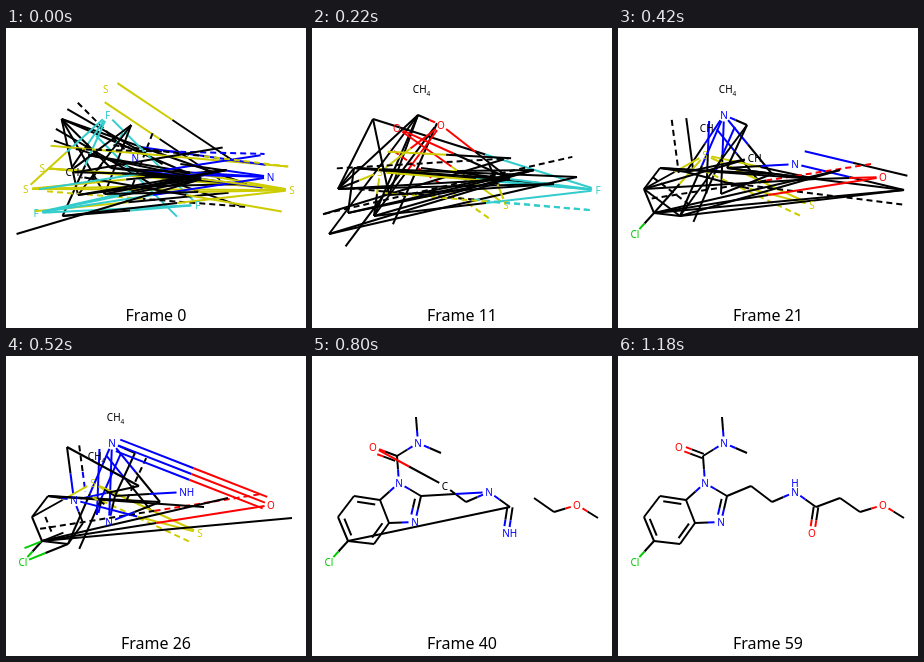
Write an HTML page with a canvas that moves like this. It is 300 px wide and 300 px high and loops after 1400 ms.

```html
<!DOCTYPE html>
<html lang="en">
<head>
<meta charset="utf-8">
<style>
  html, body { margin: 0; width: 100%; height: 100%; overflow: hidden; background: #fff; }
  canvas { display: block; width: 300px; height: 300px; }
</style>
</head>
<body>
<canvas id="stage"></canvas>
<script>
const LOOP = 1400, STEP = 20, LAST = 59;
const FONT = '"Noto Sans", "Open Sans", sans-serif';
const COLORS = { C: '#000', N: '#00f', O: '#f00', S: '#cccc00', F: '#33cccc', Cl: '#00cc00' };

// Atoms a..x
const ATOMS = [
  [104, 61], [106, 87], [129, 97], [85, 100], [61, 91], [87, 127],
  [109, 140], [103, 166], [77, 167], [68, 144], [42, 140], [26, 161],
  [36, 185], [62, 188], [17, 206], [133, 130], [154, 146], [177, 136],
  [198, 151], [194, 177], [222, 142], [242, 156], [265, 149], [286, 162]
];

// Bond kinds: 1 single, 2 double, 3 triple, 4 aromatic, 5 ring double, 6 ring aromatic.
// The second strand of a bond lies to the left of its direction.
const KEYS = [
  { at: 0, labels: 'a:S b:F j:CH4 k:S l:S m:F p:N t:F w:N x:S',
    bonds: 'au2 eq2 eg4 ve2 ei1 es1 eh1 bj4 bl4 bn1 tb2 ci1 cj1 ch4 kx2 kv1 ks1 lx1 ul2 lb1 lv1 ' +
           'xf2 vk4 mw2 mt1 ms1 mu1 nt1 nx1 os1 jw4 wp2 gw1 rw1 hx1 iu2 hu1 is1 fs1 gx4' },
  { at: 5, labels: 'a:F c:O d:NH g:S k:O m:HO n:F w:N',
    bonds: 'ax1 aq1 as1 aj1 ai1 ah4 el1 ei1 he4 eg4 eo1 bo4 bs1 bl1 bt1 lc2 cn1 cs1 ku4 ks1 ' +
           'kr1 xk4 mx1 ms1 nd1 ng1 nu1 hw1 iw1 ow2 lx2 os4 ls1 lv1 iv1 jv1 jx1 gr2 hs1' },
  { at: 11, labels: 'a:CH4 c:O d:O j:S q:CH t:S x:F',
    bonds: 'el1 ei1 ex1 bc1 bo2 bn2 bi1 bl1 cj1 cs1 cn1 td4 ds1 js2 jv1 ju1 jn1 jl1 os2 ow4 ' +
           'xk4 xj4 gx1 nx1 kl1 km1 ks1 kw1 ls4 lv1 ms1 mu1 nu1 hu1 rt1 iv1' },
  { at: 21, labels: 'a:CH4 b:N d:CH f:S o:Cl p:CH r:N t:S w:O',
    bonds: 'bc1 ej4 bn2 hb2 qb2 bj1 fs1 tf4 fm1 fl1 jt1 gr1 rx2 xg4 mw4 sw1 kl1 jk1 lm1 mn1 mo1 ' +
           'jp1 mu1 mx1 lp1 kq1 nu1 ni1 ks1 ls1 gs1 cg1 ci1 nx1 hq1 ln4' },
  { at: 30, labels: 'b:N d:CH4 f:N h:N j:N o:Cl r:NH t:H2S w:O',
    bonds: 'ae4 ej4 ep1 bw3 bc1 cg4 bg2 bq2 fj6 gf6 hg6 ih1 ij1 jk1 kl6 lm6 mn6 ni1 mo1 mv1 on2 ' +
           'uh2 ms4 gr1 rs1 wx1' },
  { at: 40, labels: 'b:N e:O f:N h:N o:Cl p:C r:N t:NH w:O',
    bonds: 'ab1 bc1 bd1 de2 df1 fg1 hg5 hi1 ij1 fj1 jk5 kl1 lm5 mn1 ni5 mo1 ep1 pq1 qr1 gr1 rs1 ' +
           'st2 ms1 uv1 vw1 wx1' },
  { at: 59, labels: 'b:N e:O f:N h:N o:Cl r:N^H t:O w:O',
    bonds: 'ab1 bc1 bd1 de2 df1 fg1 hg5 hi1 ij1 fj1 jk5 kl1 lm5 mn1 ni5 mo1 gp1 pq1 qr1 rs1 st2 ' +
           'su1 uv1 vw1 wx1' }
].map(k => ({
  at: k.at,
  labels: Object.fromEntries(k.labels.split(' ').map(s => s.split(':'))),
  bonds: Object.fromEntries(k.bonds.split(' ').map(s => [[s[0], s[1]].sort().join(''), s]))
}));

const canvas = document.getElementById('stage');
const ctx = canvas.getContext('2d');
const ratio = window.devicePixelRatio || 1;
canvas.width = canvas.height = 300 * ratio;

function hash(text) {
  let h = 2166136261;
  for (const ch of text) h = Math.imul(h ^ ch.charCodeAt(0), 16777619);
  h = Math.imul(h ^ (h >>> 15), 2246822507);
  return ((h ^ (h >>> 13)) >>> 0) / 4294967296;
}

// Every entry flips from one key state to the next at its own random moment
function mix(from, to, u, seed) {
  const out = {};
  for (const id of new Set([...Object.keys(from), ...Object.keys(to)])) {
    const value = (u > hash(id + seed) * 0.97 ? to : from)[id];
    if (value) out[id] = value;
  }
  return out;
}

function stateAt(frame) {
  let i = 0;
  while (i < KEYS.length - 2 && frame >= KEYS[i + 1].at) i++;
  const a = KEYS[i], b = KEYS[i + 1];
  const u = (frame - a.at) / (b.at - a.at);
  return {
    labels: mix(a.labels, b.labels, u, 'atom' + i),
    bonds: Object.values(mix(a.bonds, b.bonds, u, 'bond' + i))
  };
}

const element = label => !label ? 'C' : label === 'Cl' ? 'Cl' : label.match(/[NOSFC]/)[0];

function position(id, frame) {
  const [x, y] = ATOMS[id.charCodeAt(0) - 97];
  return [x + (x - 286) * 0.024 * Math.max(0, 1 - frame / 5), y];
}

function bondLength(bond, frame) {
  const [x1, y1] = position(bond[0], frame), [x2, y2] = position(bond[1], frame);
  return Math.hypot(x2 - x1, y2 - y1);
}

function line(x1, y1, x2, y2, color, dashed) {
  ctx.setLineDash(dashed ? [6, 4] : []);
  ctx.strokeStyle = color;
  ctx.beginPath();
  ctx.moveTo(x1, y1);
  ctx.lineTo(x2, y2);
  ctx.stroke();
}

function drawBond(bond, labels, frame, gap, terminal) {
  const [p, q, kind] = bond;
  const [x1, y1] = position(p, frame), [x2, y2] = position(q, frame);
  const len = bondLength(bond, frame);
  const ux = (x2 - x1) / len, uy = (y2 - y1) / len;
  const colors = [p, q].map(id => COLORS[element(labels[id])]);
  const base = terminal ? -gap / 2 : 0;

  function strand(shift, dashed = false, trim = 0) {
    const start = Math.max(labels[p] ? 6.5 : 0, trim);
    const end = len - Math.max(labels[q] ? 6.5 : 0, trim);
    const at = d => [x1 + ux * d + uy * shift, y1 + uy * d - ux * shift];
    if (colors[0] === colors[1]) {
      line(...at(start), ...at(end), colors[0], dashed);
    } else {
      line(...at(start), ...at(len / 2), colors[0], dashed);
      line(...at(len / 2), ...at(end), colors[1], dashed);
    }
  }

  switch (+kind) {
    case 1: strand(0); break;
    case 2: strand(base); strand(base + gap); break;
    case 3: strand(-gap / 2); strand(0); strand(gap / 2); break;
    case 4: strand(terminal ? -base : 0); strand(terminal ? base : gap, true); break;
    case 5: strand(0); strand(gap, false, 4); break;
    case 6: strand(0); strand(gap, true, 5);
  }
}

function drawLabel(id, label, frame) {
  const [x, y] = position(id, frame);
  const font = small => { ctx.font = (small ? 6.5 : 10) + 'px ' + FONT; };
  ctx.fillStyle = COLORS[element(label)];
  ctx.textAlign = 'left';
  const [main, above] = label.split('^');
  const parts = main.match(/Cl|[A-Z]|\d/g);
  const widths = parts.map(s => { font(/\d/.test(s)); return ctx.measureText(s).width; });
  const anchor = parts[0] === 'H' ? parts.length - 1 : 0;
  let left = x - widths[anchor] / 2;
  for (let i = 0; i < anchor; i++) left -= widths[i];
  parts.forEach((s, i) => {
    const sub = /\d/.test(s);
    font(sub);
    ctx.fillText(s, left, y + (sub ? 6.5 : 3.7));
    left += widths[i];
  });
  if (above) {
    font(false);
    ctx.textAlign = 'center';
    ctx.fillText(above, x, y - 5);
  }
}

function draw(frame) {
  const { labels, bonds } = stateAt(frame);
  const degree = {};
  let total = 0;
  for (const bond of bonds) {
    for (const id of bond.slice(0, 2)) degree[id] = (degree[id] || 0) + 1;
    total += bondLength(bond, frame);
  }
  // Strands spread with the mean bond length
  const gap = Math.max(4.6, 0.15 * total / bonds.length);

  ctx.setTransform(ratio, 0, 0, ratio, 0, 0);
  ctx.fillStyle = '#fff';
  ctx.fillRect(0, 0, 300, 300);
  ctx.lineWidth = 2;
  for (const bond of bonds) {
    drawBond(bond, labels, frame, gap, degree[bond[0]] === 1 || degree[bond[1]] === 1);
  }
  for (const id in labels) drawLabel(id, labels[id], frame);
  ctx.fillStyle = '#000';
  ctx.textAlign = 'center';
  ctx.font = '16px ' + FONT;
  ctx.fillText('Frame ' + frame, 150, 292.5);
}

function tick() {
  const t = performance.now() % LOOP;
  draw(Math.min(LAST, Math.floor(t / STEP)));
  requestAnimationFrame(tick);
}
tick();
</script>
</body>
</html>
```
